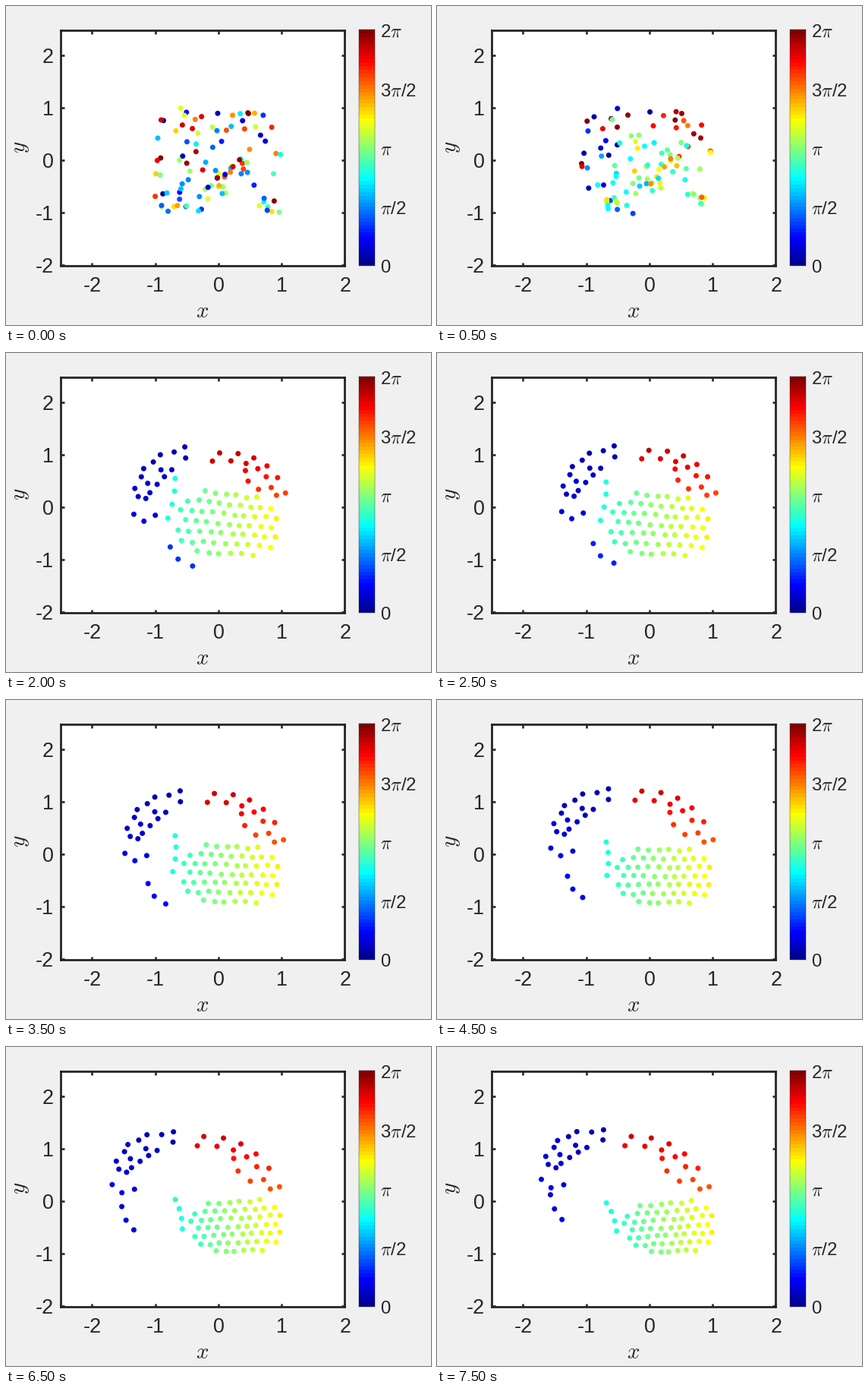
Write a matplotlib script that moves like this. It is 560 px wide and 420 px high and loops after 8 s.

```python
import numpy as np
import matplotlib.pyplot as plt
from matplotlib.animation import FuncAnimation
from matplotlib.colors import ListedColormap

W, H, DPI = 560, 420, 100
STEPS, STEP_MS = 16, 500
SETTLE = 3  # steps the scatter takes to sort itself
PX = 72 / DPI
INK = "#262626"
LEFT, RIGHT, TOP, BOTTOM = 71.5, 446.5, 31.5, 341.5

plt.rcParams.update({"font.family": "Liberation Sans", "mathtext.fontset": "cm",
                     "axes.unicode_minus": False})

v = np.arange(1, 65) / 64
JET = ListedColormap(np.clip(
    np.stack([1.5 - abs(4 * v - c) for c in (3, 2, 1)], axis=1), 0, 1))

rng = np.random.default_rng(5)


def to_px(x, y):
    return 280 + 83.33 * x, 203.4 - 69 * y


def arc(n, a, b, c):
    """n dots on the parabola through three points."""
    a, b, c = np.array([a, b, c], float)
    u = np.linspace(0, 1, n)[:, None]
    return a * (1 - u) * (1 - 2 * u) + 4 * b * u * (1 - u) + c * u * (2 * u - 1)


def lattice(cx, cy, rx, ry, step):
    """Slightly uneven hexagonal packing of a rounded box."""
    j, i = np.mgrid[-9:10, -9:10]
    x, y = (i + j % 2 / 2) * step, j * step * 0.86
    inside = abs(x / rx) ** 3 + abs(y / ry) ** 3 < 1
    pts = np.stack([cx + x[inside], cy + y[inside]], axis=1)
    return pts + rng.normal(0, 0.8, pts.shape)


def ease(q, power):
    return 1 - (1 - q) ** power


class Group:
    """Dots that drift with a linear flow; home is their place half way.

    dx and dy hold the drift at the centre and its change along x and y.
    """

    def __init__(self, home, centre, scale, dx, dy, powers, hue, shift=0):
        self.home, self.powers, self.hue, self.shift = home, powers, hue, shift
        a, b = ((home - np.array(centre)) / scale).T
        basis = np.stack([np.ones_like(a), a, b, a * b])
        self.drift = np.stack([np.array(dx) @ basis, np.array(dy) @ basis], axis=1)

    def at(self, q):
        s = [ease(q, p) - ease(0.5, p) for p in self.powers]
        return self.home + self.drift * s, self.hue + self.shift * (1 - q) ** 4


blue = np.vstack([
    arc(5, (226, 117), (168, 139), (150, 195)),
    arc(5, (211, 122), (164, 149), (163, 205)),
    arc(5, (226, 131), (172, 158), (179, 199)),
    arc(4, (206, 144), (190, 156), (174, 170)),
])
tail = arc(3, (172, 232), (179, 249), (192, 260))
red = np.vstack([
    arc(6, (270, 120), (327, 135), (364, 184)),
    arc(6, (261, 132), (316, 141), (344, 175)),
    arc(4, (307, 148), (318, 171), (352, 187)),
])
blob = np.vstack([
    arc(4, (223, 187), (226, 208), (224, 231)),
    lattice(299, 232, 65, 38, 13.4),
])

GROUPS = [
    Group(blue, (180, 160), (30, 40), (-28, 2, -6, 0), (-31, 7, -4, 0),
          (1.5, 1), 0.035 + 0.0007 * (blue[:, 1] - 117)),
    Group(tail, (180, 247), (30, 40), (-85, -25, 0, 0), (-62, 12, 0, 0),
          (1.8, 0.8), 0.09, 0.11),
    Group(red, (310, 150), (40, 25), (-20, 3, 4, 0), (-10, 2, 5, 0),
          (1, 3), 0.91 - 0.0019 * (red[:, 1] - 120), 0.03),
    Group(blob, (290, 230), (60, 35), (16, -8, 11, -8), (16, -11, -9, 4),
          (1, 1.3), 0.40 + 0.0017 * (blob[:, 0] - 224)),
]


def settled(q):
    parts = [g.at(q) for g in GROUPS]
    return (np.vstack([p for p, _ in parts]),
            np.concatenate([np.broadcast_to(h, len(p)) for p, h in parts]))


def make_start():
    """Random square of dots, each settled dot taking the closest free one."""
    goal, goal_hue = settled(0)
    n = len(goal)
    pos = np.stack(to_px(*rng.uniform(-1, 1, (2, n))), axis=1)
    hue = rng.random(n)
    free = np.ones(n, bool)
    order = []
    for p, h in zip(goal, goal_hue):
        gap = abs((h - hue + 0.5) % 1 - 0.5)
        cost = np.hypot(*(pos - p).T) + 60 * gap
        k = int(np.argmin(np.where(free, cost, np.inf)))
        free[k] = False
        order.append(k)
    return pos[order], hue[order]


START, START_HUE = make_start()


def state(i):
    if i >= SETTLE:
        return settled((i - SETTLE) / (STEPS - 1 - SETTLE))
    u = i / SETTLE
    goal, goal_hue = settled(0)
    turn = (goal_hue - START_HUE + 0.5) % 1 - 0.5
    return START + (goal - START) * u, (START_HUE + turn * ease(u, 2)) % 1


def panel(x0, y0, x1, y1):
    return fig.add_axes([x0 / W, 1 - y1 / H, (x1 - x0) / W, (y1 - y0) / H])


def label(x, y, text, size, ha="center", va="baseline", **kw):
    fig.text(x / W, 1 - y / H, text, fontsize=size * PX, color=INK,
             ha=ha, va=va, **kw)


def outline(axes, width):
    for spine in axes.spines.values():
        spine.set(linewidth=width * PX, color=INK)


fig = plt.figure(figsize=(W / DPI, H / DPI), dpi=DPI, facecolor="#f0f0f0")

ax = panel(LEFT, TOP, RIGHT, BOTTOM)
ax.set(xlim=(LEFT, RIGHT), ylim=(BOTTOM, TOP))
marks = np.arange(-2, 3)
tick_x, tick_y = to_px(marks, marks)
ax.set_xticks(tick_x, [])
ax.set_yticks(tick_y, [])
ax.tick_params(direction="in", length=4.5 * PX, width=2.6 * PX, color=INK,
               top=True, right=True)
outline(ax, 2.8)
for k, x, y in zip(marks, tick_x, tick_y):
    label(x, 376.5, str(k), 27)
    label(62.5, y + 10, str(k), 27, ha="right")
label(259, 410.5, "$x$", 29)
label(19, 186, "$y$", 29, va="center", rotation=90)

bar = panel(465, 31, 486, 342)
bar.imshow(np.arange(64)[::-1, None], cmap=JET, aspect="auto",
           interpolation="nearest")
bar.set_xticks([])
bar.set_yticks([])
outline(bar, 0.4)
for k, text in enumerate(["0", r"$\pi$/2", r"$\pi$", r"3$\pi$/2", r"2$\pi$"]):
    label(493, 351 - 77.6 * k, text, 24, ha="left")

dots = ax.scatter(*START.T, c=START_HUE, cmap=JET, vmin=0, vmax=1,
                  s=(7 * PX) ** 2, linewidths=0, zorder=3)


def draw(i):
    pos, hue = state(i)
    dots.set_offsets(pos)
    dots.set_array(hue)
    return (dots,)


anim = FuncAnimation(fig, draw, frames=STEPS, interval=STEP_MS, repeat=True,
                     repeat_delay=0, blit=False)
plt.show()
```
